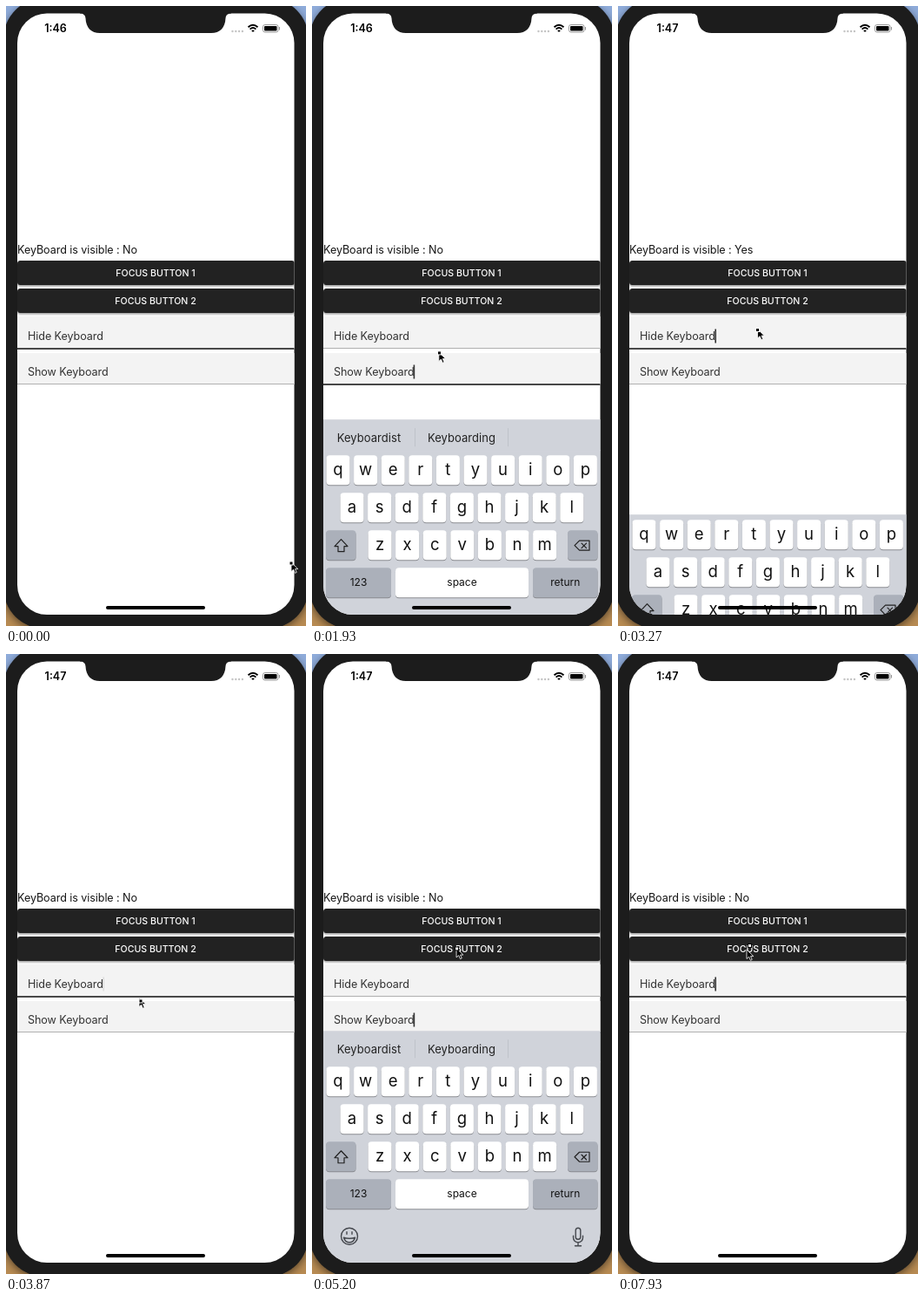
These frames come from a looping animation (345 px wide and 711 px high, 8 s). An HTML page:

```html
<!DOCTYPE html>
<html lang="en">
<head>
<meta charset="utf-8">
<title>Keyboard focus demo</title>
<style>
html, body { margin: 0; width: 100%; height: 100%; overflow: hidden; }
svg { display: block; width: 345px; height: 711px; font-family: Inter, Roboto, sans-serif; }
.body { font-size: 12.6px; letter-spacing: -.08px; fill: #151515; }
.field { fill: #333; }
.button { font-size: 10.6px; font-weight: 500; fill: #fff; text-anchor: middle; }
.key { font-size: 18.5px; text-anchor: middle; fill: #111; }
.small { font-size: 12px; }
.word { font-size: 13px; letter-spacing: .06px; text-anchor: middle; fill: #222; }
.line { fill: none; stroke: #222; stroke-width: 1.2; stroke-linecap: round; stroke-linejoin: round; }
.icon { stroke: #45484e; stroke-width: 1.4; }
</style>
</head>
<body>
<svg viewBox="0 0 345 711">
  <defs>
    <linearGradient id="desk" x2="0" y2="1">
      <stop offset="0" stop-color="#8facdb"/>
      <stop offset=".5" stop-color="#8a8a90"/>
      <stop offset="1" stop-color="#b88b52"/>
    </linearGradient>
    <clipPath id="screen"><rect x="13" y="8.5" width="318.500" height="689.500" rx="34"/></clipPath>
    <filter id="shadow" x="-5%" y="-20%" width="110%" height="160%">
      <feDropShadow dx="0" dy="1.5" stdDeviation="1" flood-opacity=".4"/>
    </filter>
    <filter id="glow"><feDropShadow dx="0" dy="3" stdDeviation="5" flood-opacity=".5"/></filter>
  </defs>
  <rect width="345" height="711" fill="url(#desk)"/>
  <rect x="-3" y="-9" width="351" height="723" rx="47" fill="#1c1c1c" filter="url(#glow)"/>
  <g clip-path="url(#screen)">
    <rect x="13" y="8" width="319" height="690" fill="#fff"/>
    <text id="label" class="body" x="13" y="284"></text>
    <path d="M13 356H332V393H13zM13 398H332V434H13z" fill="#f3f3f3"/>
    <g fill="#212121" filter="url(#shadow)">
      <rect x="13" y="292" width="319" height="28" rx="3.5"/>
      <rect x="13" y="324" width="319" height="28" rx="3.5"/>
    </g>
    <text class="button" x="172" y="310">FOCUS BUTTON 1</text>
    <text class="button" x="172" y="342">FOCUS BUTTON 2</text>
    <text class="body field" x="25" y="383">Hide Keyboard</text>
    <text class="body field" x="25" y="424">Show Keyboard</text>
    <rect id="hideLine" x="13" y="392" width="319"/>
    <rect id="showLine" x="13" y="433" width="319"/>
    <rect id="caret" width="1.6" height="16" fill="#333"/>
    <g id="keyboard">
      <rect x="13" y="467" width="319" height="240" fill="#d0d3da"/>
      <g id="bar">
        <rect x="13" y="432" width="319" height="36" fill="#d0d3da"/>
        <path d="M118.5 442V463M225.5 442V463" stroke="#bfc3ca"/>
        <text class="word" x="65.5" y="458">Keyboardist</text>
        <text class="word" x="172" y="458">Keyboarding</text>
      </g>
      <g id="keys"></g>
      <path class="line" d="M33.5 569.5L41 577.5H37V583.5H30V577.5H26z"/>
      <path class="line" d="M302 576.5L307.5 571H319V582H307.5zM310 574L315.5 579.5M315.5 574L310 579.5"/>
      <g class="line icon">
        <circle cx="43" cy="667.5" r="9.5"/>
        <path d="M36.5 669Q43 671 49.5 669Q48 674.5 43 674.5Q38 674.5 36.5 669M40 662.5V665M46 662.5V665"/>
        <rect x="303.2" y="658" width="5.6" height="13" rx="2.8"/>
        <path d="M300.5 667V669A5.5 5.5 0 0 0 311.5 669V667M306 674.5V678.5M302.5 678.5H309.5"/>
      </g>
    </g>
    <rect x="115" y="688" width="114" height="4" rx="2"/>
  </g>
  <path d="M85 7V8.500Q91 8.500 91.500 14C92 25 98 31 108 31H236C246 31 252 25 252.500 14Q253 8.500 259 8.500V7z" fill="#1c1c1c"/>
  <text id="clock" x="57" y="30" font-size="12.5" font-weight="600" text-anchor="middle"></text>
  <path d="M260.500 29H273" stroke="#c4c4c4" stroke-width="2.4" stroke-linecap="round" stroke-dasharray="0 3.800"/>
  <g fill="none" stroke="#000" stroke-width="1.900">
    <path d="M278.500 24.300Q284 19.300 289.500 24.300M280.600 26.600Q284 23.600 287.400 26.600"/>
    <path d="M282.200 28.300Q284 26.600 285.800 28.300L284 30z" fill="#000" stroke="none"/>
  </g>
  <rect x="295.500" y="21.500" width="17.500" height="8.500" rx="2.300" fill="none" stroke="#999"/>
  <rect x="297" y="23" width="14.500" height="5.500" rx="1"/>
  <path d="M314.500 24V27.500" stroke="#999"/>
  <g id="arrow">
    <path d="M0 0V10.500L2.600 8.200L4.400 12.300L6.200 11.500L4.500 7.600H7.800z" stroke="#fff" stroke-width=".8"/>
  </g>
  <rect id="dot" x="-2" y="-2" width="4" height="4"/>
</svg>
<script>
const $ = id => document.getElementById(id);
const set = (id, attrs) => {
  for (const k in attrs) $(id).setAttribute(k, attrs[k]);
};

let keys = '';
function addKey(x, y, w, text, dark, small) {
  const box = (top, fill) => `<rect x="${x}" y="${top}" width="${w}" height="34" rx="4" fill="${fill}"/>`;
  keys += box(y + 1, '#898b90') + box(y, dark ? '#abb0ba' : '#fff') +
    `<text class="key ${small ? 'small' : ''}" x="${x + w / 2}" y="${y + (small ? 21 : 22.5)}">${text}</text>`;
}
[['qwertyuiop', 30], ['asdfghjkl', 46], ['zxcvbnm', 78]].forEach(([row, x], r) =>
  [...row].forEach((c, i) => addKey(x + i * 31.6 - 13.5, 473 + r * 43, 27, c)));
addKey(16, 559, 34.5, '', true);
addKey(294, 559, 34.5, '', true);
addKey(16, 602, 75, '123', true, true);
addKey(96, 602, 153, 'space', false, true);
addKey(254, 602, 74.5, 'return', true, true);
$('keys').innerHTML = keys;

// visible from, motion start, keyboard open, focused field
const states = [
  [0, -810, 0, 'hide'],
  [1790, 1750, 1, 'show'],
  [3270, 3190, 0, 'hide'],
  [4730, 4695, 1, 'show'],
  [6070, 5936, 0, ''],
  [7400, 7400, 0, 'hide']
];
// time, arrow x, y, dot offset x, y
const path = [
  [0, 328, 638, 0, 1], [130, 328, 638, 0, 1], [330, 295, 573, 2, 2], [430, 295, 573, 2, 2],
  [1200, 134, 403, 6.5, 8], [1270, 134, 403, 6.5, 8], [1700, 138, 411, 1, 1], [1800, 138, 411, 1, 1],
  [2130, 160.5, 370.5, 0, 1], [3270, 160.5, 370.5, 0, 1], [3870, 153, 394, 2, 4], [4070, 153, 394, 2, 4],
  [4270, 149, 407.5, 1, 1], [4870, 149, 407.5, 1, 1], [5530, 183, 268, 0, 0], [6060, 183, 268, 0, 0],
  [6870, 134, 374, 2, 2], [6920, 134, 374, 2, 2], [7200, 139, 349, 2, 1], [7390, 139, 349, 2, 1],
  [7930, 148, 339, 3.5, -4.5], [8000, 148, 339, 3.5, -4.5]
];
const clamp = v => Math.max(0, Math.min(1, v));
const between = (t, a, b) => t >= a && t < b;

function pointer(t) {
  const i = path.findIndex(p => p[0] > t);
  const a = path[i - 1], b = path[i];
  const u = (t - a[0]) / (b[0] - a[0]), e = u * u * (3 - 2 * u);
  return a.map((v, k) => v + (b[k] - v) * e);
}

function underline(id, focused) {
  set(id, { height: focused ? 2 : 1, fill: focused ? '#484848' : '#b0b0b0' });
}

function draw(t) {
  const n = states.filter(s => s[0] <= t).length - 1;
  const [, start, open, focus] = states[n];
  const moving = n > 0 && states[n - 1][2] !== open;
  // critically damped spring
  const w = (t - start) * .01826;
  const rest = moving ? (1 + w) * Math.exp(-w) : 0;
  const drop = 267 * (open ? rest : 1 - rest);
  set('keyboard', { transform: `translate(0 ${drop})` });
  set('bar', { visibility: open ? 'visible' : 'hidden' });

  underline('hideLine', focus === 'hide');
  underline('showLine', focus === 'show');
  const p = (t - start) % 1000;
  const blink = p < 800 ? clamp((690 - p) / 80) : clamp((p - 940) / 60);
  set('caret', {
    x: focus === 'show' ? 116.6 : 111.4,
    y: focus === 'show' ? 411.5 : 370.5,
    opacity: focus ? blink : 0
  });

  const shown = between(t, 2265, 3700) || between(t, 5210, 6450);
  $('label').textContent = 'KeyBoard is visible : ' + (shown ? 'Yes' : 'No');
  $('clock').textContent = t < 2540 ? '1:46' : '1:47';

  const [, x, y, dx, dy] = pointer(t);
  const onButton = between(y, 292, 352);
  set('arrow', { transform: `translate(${x} ${y})` });
  set('dot', {
    transform: `translate(${x + dx} ${y + dy})`,
    fill: onButton ? '#fff' : '#000',
    stroke: onButton ? '#000' : '#fff'
  });
}

function frame() {
  draw(performance.now() % 8000);
  requestAnimationFrame(frame);
}
frame();
</script>
</body>
</html>
```
